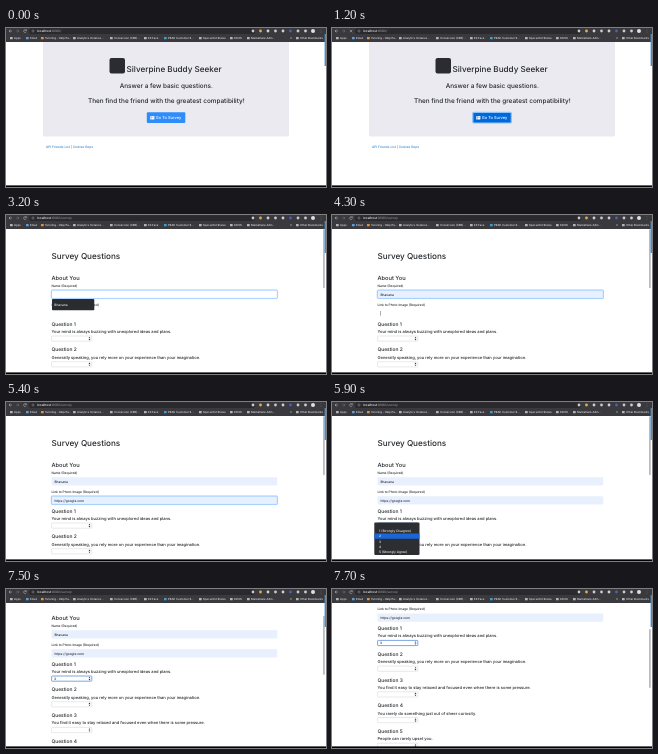
Write an HTML page that moves like this. It is 320 px wide and 159 px high and loops after 8 s.

```html
<!DOCTYPE html>
<html lang="en">
<head>
<meta charset="utf-8">
<title>Survey walkthrough</title>
<style>
html, body { margin: 0; width: 100%; height: 100%; overflow: hidden; background: #fff; }
svg { display: block; width: 100vw; height: 100vh; }
text { font-family: Inter, Roboto, sans-serif; font-weight: 500; text-rendering: geometricPrecision; white-space: pre; }
</style>
</head>
<body>
<svg id="stage" viewBox="0 0 320 159"></svg>
<script>
const LOOP = 8000, STEP = 100;
const INK = '#212529', FOCUS = '#80bdff', FILLED = '#e8f0fe';
const BODY = 4.07, SMALL = 3.22;
const NAME = 'Bhavana', LINK = 'https://google.com';
const QUESTIONS = [
  'Your mind is always buzzing with unexplored ideas and plans.',
  'Generally speaking, you rely more on your experience than your imagination.',
  'You find it easy to stay relaxed and focused even when there is some pressure.',
  'You rarely do something just out of sheer curiosity.',
  'People can rarely upset you.'
];
const OPTIONS = ['', '1 (Strongly Disagree)', '2', '3', '4', '5 (Strongly Agree)'];
const BOOKMARKS = [
  [8, 'Apps'], [24, 'Email'], [39, 'Tutoring - Help Pa…'], [71, 'Analytics Instance…'],
  [108, 'Conversion (CRR)…'], [142, 'E3 Face'], [162, 'PEAK Customer S…'],
  [197, 'Special Ed Status'], [228, 'KDOS'], [245, 'Marketlane Adm…'], [294, 'Other Bookmarks']
];
const EXTENSIONS = ['#c8cacd', '#e0b050', '#d0d0d3', '#c8cacd', '#d0d0d3', '#4a62b8', '#c8cacd', '#d0d0d3', '#e4dedc'];

// Text is placed by its vertical middle.
const text = (x, y, s, size = BODY, fill = INK, extra = '') =>
  `<text x="${x}" y="${y + size * 0.36}" font-size="${size}" fill="${fill}" ${extra}>${s}</text>`;
const rect = (x, y, w, h, fill, extra = '') =>
  `<rect x="${x}" y="${y}" width="${w}" height="${h}" fill="${fill}" ${extra}/>`;
const line = (d, color, width = 0.5) =>
  `<path d="${d}" fill="none" stroke="${color}" stroke-width="${width}"/>`;
const between = (t, a, b) => t >= a && t < b;

function browser(t) {
  const loading = between(t, 700, 1900), page = t >= 1400 ? 'survey' : '';
  const icon = '#c4c6c9';
  let s = rect(0, 0, 320, 14, '#3a393d') + rect(23, 0.3, 226, 5.8, '#2a292d', 'rx="2.9"');
  s += line('M6 3H3M4.4 1.6L3 3L4.4 4.4', icon);
  s += line('M10 3H13M11.6 1.6L13 3L11.6 4.4', '#77797d');
  s += loading
    ? line('M17.8 1.8L20.2 4.2M20.2 1.8L17.8 4.2', icon)
    : line('M20.2 2.3A1.4 1.4 0 1 0 20.3 3.7M20.4 1.4V2.5H19.3', icon);
  s += `<circle cx="27" cy="3" r="1.1" fill="none" stroke="${icon}" stroke-width=".35"/>`;
  s += text(31, 3, `localhost<tspan fill="#8f9296">:8080/${page}</tspan>`, SMALL, '#eee');
  EXTENSIONS.forEach((c, i) => {
    s += `<circle cx="${247 + i * 7.5}" cy="3" r="${i == 8 ? 2 : 1.4}" fill="${c}"/>`;
  });
  s += line('M315 1.6V1.9M315 2.9V3.2M315 4.2V4.5', icon);
  BOOKMARKS.forEach(([x, label], i) => {
    const color = i == 1 ? '#5aa0e0' : i == 2 ? '#e0963c' : i == 6 ? '#3ca0d0' : '#b4b5b8';
    s += rect(x - 4, 8.9, 2.7, 2.3, color, 'rx=".3"') + text(x, 10, label, 2.75, '#e0e1e3');
  });
  return s + text(284, 10, '»', 3.4, icon);
}

function home(t) {
  const mid = 'text-anchor="middle"';
  const button = t >= 200 ? '#0069d9' : t >= 100 ? '#0374ee' : '#2f8dfb';
  const ring = t >= 1200 ? 'stroke="#8fc3fb" stroke-width="1.2"' : '';
  return rect(37, 13, 246, 95.5, '#ebeaf1', 'rx="1"')
    + rect(103.5, 30, 15.5, 15.5, '#2b2c31', 'rx="2"')
    + text(120.5, 41, 'Silverpine Buddy Seeker', 8.15)
    + text(160.3, 57.8, 'Answer a few basic questions.', 6.4, INK, mid)
    + text(160.3, 73, 'Then find the friend with the greatest compatibility!', 6.4, INK, mid)
    + rect(140.8, 84.3, 38.5, 10.7, button, `rx="1" ${ring}`)
    + rect(144.2, 88, 4.2, 3.5, '#fff', 'rx=".4"')
    + line('M144.2 89.2H148.4M145.6 88V91.5', button, 0.35)
    + text(149.7, 89.7, 'Go To Survey', 4, '#fff')
    + text(40, 119, 'API Friends List | Codvex Repo', SMALL, '#3585cc');
}

function field(y, { value = '', focus, caret }) {
  let s = '';
  if (focus) s += rect(45.2, y - 0.2, 226.4, 8.6, 'none', 'rx="1" stroke="#bfdeff" stroke-width="1"');
  s += rect(45.5, y, 225.8, 8.2, value ? FILLED : '#fff',
    focus ? `rx=".8" stroke="${FOCUS}" stroke-width=".6"` : 'rx=".8"');
  if (caret) s += rect(48.2, y + 1.8, 0.4, 4.6, '#333');
  return s + text(48.5, y + 4.2, value, SMALL);
}

const suggestion = (y, label, active) =>
  rect(46, y, 42.3, 11.3, '#2b2c2f', 'rx=".8"')
  + (active ? rect(46, y + 2, 42.3, 7.3, '#4a4b4e') : '')
  + text(48.3, y + 5.7, label, SMALL, '#e6e6e6');

function select(y, value, focus) {
  return rect(45.6, y, 40.2, 5.2, '#fff',
      focus ? 'rx=".6" stroke="#5f8fdc" stroke-width=".8"' : 'rx=".6" stroke="#b4b4b4" stroke-width=".3"')
    + text(48, y + 2.6, value, SMALL)
    + `<path d="M82.6 ${y + 2.2}l.9-1.4l.9 1.4zM82.6 ${y + 3}l.9 1.4l.9-1.4z" fill="#333"/>`;
}

function optionList(t) {
  const row = t < 5800 ? 0 : t < 5900 ? 1 : t < 6100 ? 2 : 3;
  const flash = between(t, 6400, 6500), high = 5.25;
  let s = rect(42.3, 120.6, 45.2, 32.3, '#2d2e31', 'rx="1"');
  if (!flash) s += rect(42.3, 121 + row * high, 45.2, high, '#1a66d6');
  OPTIONS.forEach((label, i) => { s += text(47, 121 + (i + 0.5) * high, label, SMALL, '#f0f0f0'); });
  return `<g opacity="${t >= 6500 ? 0.6 : 1}">${s}</g>`;
}

function survey(t) {
  const scroll = [0, 9, 34, 58, 69.6][Math.max(0, Math.min(4, (t - 7300) / STEP))];
  let s = text(45.5, 41, 'Survey Questions', 8.15)
    + text(45.5, 62.5, 'About You', 5.7)
    + text(45.5, 70.8, 'Name (Required)', SMALL)
    + text(45.5, 89.8, 'Link to Photo Image (Required)', SMALL);
  s += field(75.2, {
    value: t >= 3700 ? NAME : '',
    focus: between(t, 2900, 4400),
    caret: between(t, 2700, 3200)
  });
  s += field(94.2, {
    value: t >= 4700 ? LINK : '',
    focus: between(t, 4400, 5500),
    caret: between(t, 4300, 4700)
  });
  QUESTIONS.forEach((q, i) => {
    const y = 109 + i * 25.7, first = i == 0;
    s += text(45.5, y, `Question ${i + 1}`, 4.9) + text(45.5, y + 7.6, q)
      + select(y + 12, first && t >= 6600 ? OPTIONS[3] : '', first && t >= 5500);
  });
  if (between(t, 2900, 3900)) s += suggestion(84, NAME, t >= 3700);
  if (between(t, 4400, 4900)) s += suggestion(103, LINK, t >= 4700);
  if (between(t, 5600, 6600)) s += optionList(t);
  return `<g transform="translate(0 ${-scroll})">${s}</g>`
    + rect(317, 14.2 + scroll * 0.37, 1.8, 59, '#b9bcc2', 'rx=".9"');
}

const stage = document.getElementById('stage');
const start = performance.now();
let shown = -1;
function draw() {
  const t = Math.floor((performance.now() - start) % LOOP / STEP) * STEP;
  if (t !== shown) {
    shown = t;
    stage.innerHTML = rect(0, 0, 320, 159, '#fff') + (t < 1700 ? home(t) : survey(t))
      + browser(t)
      + rect(318.6, 6, 1.4, 32, '#3f8fd8') // desktop beside the window
      + rect(0, 157.4, 320, 1.6, '#000');
  }
  requestAnimationFrame(draw);
}
draw();
</script>
</body>
</html>
```
